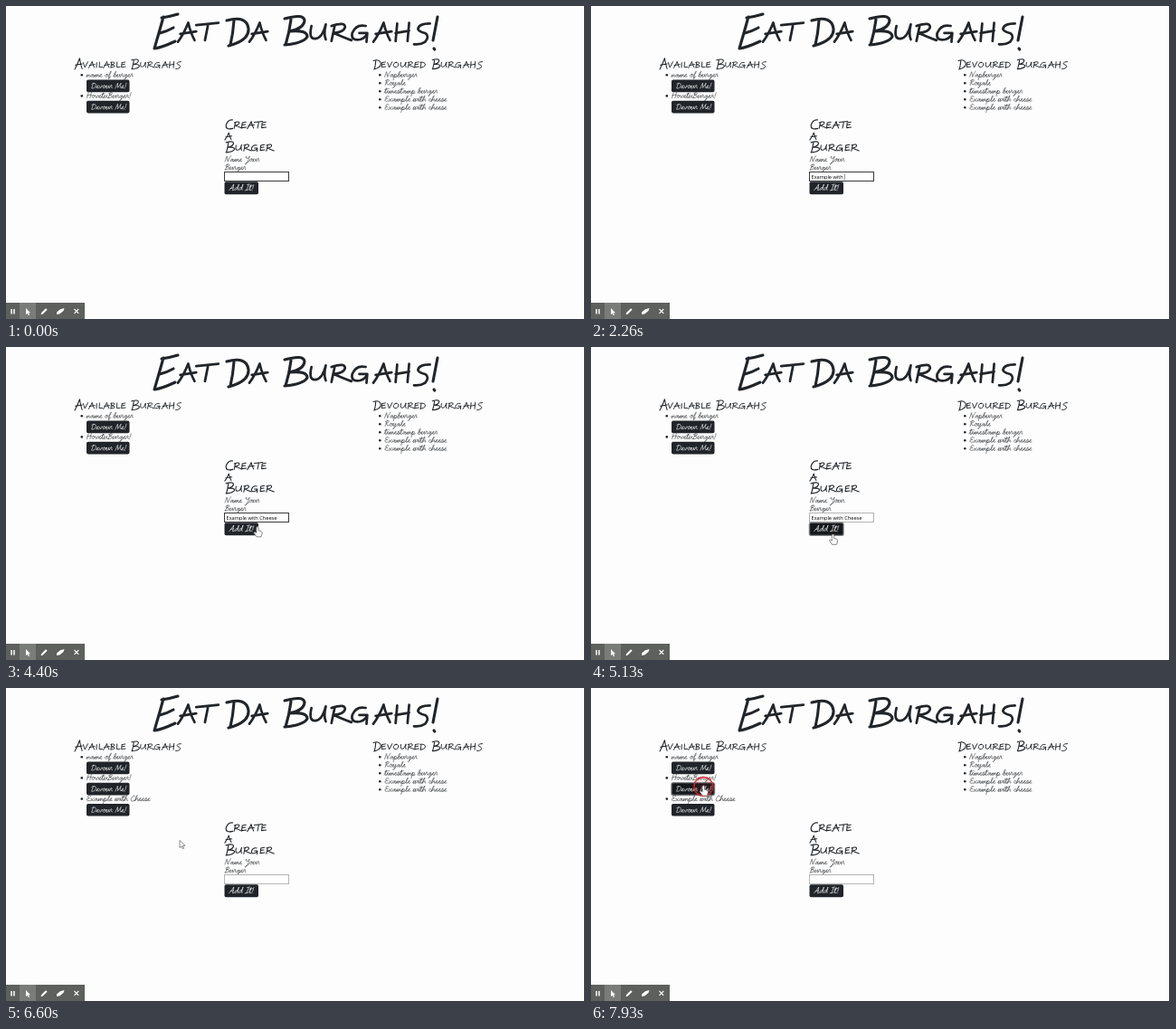
An HTML page that plays this animation: 640 by 346 pixels, repeating every 8 s.

```html
<!DOCTYPE html>
<html lang="en">
<head>
<meta charset="utf-8">
<title>Eat Da Burgahs!</title>
<style>
html, body { margin: 0; width: 100%; height: 100%; overflow: hidden; background: #fdfdfd; }
svg { display: block; width: 640px; height: 346px; }
.ink { fill: none; stroke-linecap: round; stroke-linejoin: round; }
#typed { font: 5.65px "Open Sans", "Noto Sans", sans-serif; white-space: pre; fill: #000; }
</style>
</head>
<body>
<svg id="stage" viewBox="0 0 640 346"></svg>
<script>
const LOOP = 8000, DARK = '#212529', SHIFT = 23;

// Pen-stroke alphabets: each entry is the advance width followed by the path.
const marker = {
  width: 3.1, slant: 0, space: 15, small: 'translate(1 -1) scale(.88)',
  E: '27M10-25Q18-26 28-29M12-26Q7-8 2 9Q10 8 25 1M8-8Q16-10 23-14',
  A: '24M0 6Q8-8 16-30Q18-12 24 4M2-8L24-12',
  B: '29M10-23Q8-8 4 5M3-24Q24-30 25-22Q24-13 8-10Q28-12 28-4Q24 3 3 5',
  C: '24M22-24Q8-26 3-8Q2 6 23 1',
  D: '24M8-22Q7-8 4 5M0-22Q22-28 24-13Q25 0 2 6',
  a: '22M0 3Q7-6 13-21Q16-8 21 1M3-7L23-10',
  b: '19M5-18L3 1M2-18Q16-21 16-15Q14-10 5-9Q19-9 17-3Q12 1 3 1',
  d: '23M5-17L3 2M1-18Q20-20 20-9Q18 0 2 2',
  e: '18M4-17L2 0L17-2M3-9L14-11M4-17L16-19',
  g: '26M20-17Q8-20 3-8Q1 2 13 0Q20-2 22-8L12-8M22-8L21 3',
  h: '23M5-20L3 2M20-21L18 2M3-8L20-11',
  i: '10M5-17L4 1',
  l: '16M4-19L3 0L15-1',
  o: '23M12-18Q1-16 2-6Q4 2 13 0Q22-4 20-13Q17-20 9-17',
  r: '22M6-17L2 2M2-17Q20-23 19-15Q17-9 5-8Q14-4 27 1',
  s: '20M20-20Q6-20 5-13Q6-10 14-8Q20-4 14 3Q8 7 0 6',
  t: '18M-2-18L26-21M13-19L9 1',
  u: '23M3-17Q-1 0 8-1Q17-2 21-19Q18-6 21 0',
  v: '20M3-17L9 1L20-20',
  '!': '8M7-26L2 0M3 9l.8 1'
};
const script = {
  width: 1.05, slant: -10, space: 5,
  a: '8M6-5Q1-7 1-2Q2 2 6-5Q4 2 8-1',
  b: '7M0-1Q5-8 4-12Q1-11 1-2Q2 2 5-1Q6-5 3-5L7-4',
  c: '6M5-5Q1-8 1-2Q2 1 6-1',
  d: '8M6-5Q1-7 1-2Q2 2 6-5L7-12Q4 2 8-1',
  e: '6M0-1Q5-3 4-6Q1-6 1-2Q2 1 6-1',
  f: '6M0-1Q6-8 5-12Q2-12 2 3Q2 6 4 2L2 0L6-1',
  g: '8M6-5Q1-7 1-2Q2 2 6-5Q6 5 3 6Q0 6 8-1',
  h: '8M0-1Q5-8 4-12Q1-10 1 0Q5-7 6-5Q5 1 8-1',
  i: '4M0-1L2-6Q0 1 4-1M3-9l.5 0',
  l: '5M0-1Q5-8 4-12Q1-10 2-1Q3 1 5-1',
  m: '11M0-1Q2-6 2-5L2 0Q4-7 6-5L5 0Q8-7 9-5Q8 1 11-1',
  n: '8M0-1Q2-6 2-5L2 0Q5-7 6-5Q5 1 8-1',
  o: '7M3-6Q0-5 1-2Q3 2 5-2Q6-6 3-6Q4-4 7-5',
  p: '8M0-1L2-6L1 6M2-4Q6-8 6-3Q5 1 2 0Q5 1 8-1',
  r: '6M0-1L2-7L4-6Q3 1 6-1',
  s: '6M0-1L3-7Q6-1 3 0Q1 0 2-1L6-1',
  t: '5M0-1L3-11Q1 1 3 0L5-1M0-8L6-9',
  u: '8M0-1L2-6Q0 1 3 0Q6-2 6-6Q5 1 8-1',
  v: '7M0-5Q2-6 3 0Q6-4 5-6L7-5',
  w: '10M0-1L2-6Q0 1 3 0Q5-2 5-6Q4 1 6 0Q9-3 8-6L10-5',
  x: '7M0-5Q2-6 3-2Q5 1 7-1M6-6L1 0',
  y: '8M0-1L2-6Q0 1 3 0Q6-2 6-6Q6 5 3 6Q0 6 8-1',
  A: '11M1 0Q5-4 8-12L8 0L11-1M3-4L9-5',
  B: '10M4-11L2 0M1-9Q9-14 8-9Q7-6 3-6Q10-7 8-2Q6 1 1 0',
  C: '9M8-9Q8-13 4-10Q-1-3 3 0Q6 1 9-1',
  D: '11M4-11L2 0Q10 1 10-7Q8-13 1-9',
  E: '9M8-10Q2-13 2-8Q3-6 6-6Q0-6 1-2Q3 1 9-1',
  H: '11M3-11L2 0M9-12L8 0M1-5Q6-8 11-6',
  I: '7M2-11L7-12M5-11L3 0M0 0L5-1',
  M: '13M1 0L4-11L6-1L11-11Q9 0 13-1',
  N: '11M1 0L3-11L7 0Q8-8 11-12',
  R: '10M4-11L2 0M1-9Q9-14 8-9Q7-6 3-6Q6 1 10-1',
  Y: '10M1-9Q3-14 3-7Q6-4 9-11Q7 5 3 6Q0 5 10-1',
  '!': '4M3-11L2-3M1.5 0l.3 0'
};

function write(text, x, y, scale, font = marker, color = DARK) {
  let pen = 0, out = '';
  for (const ch of text) {
    const glyph = font[ch];
    const fit = /[a-z]/.test(ch) && font.small || '';
    if (glyph) out += `<path transform="translate(${pen}) ${fit}" d="${glyph.slice(glyph.indexOf('M'))}"/>`;
    pen += glyph ? parseFloat(glyph) : font.space;
  }
  return `<g class="ink" role="img" aria-label="${text}" stroke="${color}" stroke-width="${font.width}"
    transform="translate(${x} ${y}) scale(${scale}) skewX(${font.slant})">${out}</g>`;
}
const note = (text, x, y) => write(text, x, y, .535, script, '#3c4043');
const bullet = (text, x, y) => `<circle cx="${x - 4.7}" cy="${y - 2.3}" r="1.3" fill="${DARK}"/>` + note(text, x, y);
const button = (text, x, y, w, h, scale, id) =>
  `<rect id="${id}" x="${x}" y="${y}" width="${w}" height="${h}" rx="1.8" fill="${DARK}"/>` +
  write(text, x + 4.5, y + h / 2 + 2.6, scale, script, '#f4f4f4');
const burger = (name, i) => bullet(name, 88.5, 78.5 + i * 23.2) +
  button('Devour Me!', 89, 81.6 + i * 23.2, 47.5, 13.6, .535, 'devour' + i);

const stage = document.getElementById('stage');
stage.innerHTML = `
  <rect width="640" height="346" fill="#fdfdfd"/>
  <rect x="639" width="1" height="346" fill="#333"/>
  ${write('Eat Da Burgahs!', 162, 38, 1)}
  ${write('Available Burgahs', 76, 68, .34)}
  ${write('Devoured Burgahs', 406, 68, .345)}
  ${burger('name of burger', 0)}${burger('HovetuBurger!', 1)}
  <g id="added">${burger('Example with Cheese', 2)}</g>
  ${['Napburger', 'Royale', 'timestamp burger', 'Example with cheese', 'Example with cheese']
    .map((name, i) => bullet(name, 418, 78.5 + i * 9)).join('')}
  <g id="form">
    ${write('Create', 242, 135, .38)}${write('a', 241.5, 147.5, .38)}${write('Burger', 242, 160, .38)}
    ${note('Name Your', 241.5, 172)}${note('Burger', 241.5, 181)}
    <rect id="field" x="241.5" y="183.5" width="71" height="10" fill="#fff"/>
    <text id="typed" x="243.5" y="191.2"></text>
    <rect id="caret" y="185.5" width=".6" height="7" fill="#555"/>
    ${button('Add It!', 241.5, 194.2, 37.5, 14, .57, 'add')}
  </g>
  <circle id="ripple" stroke="#e0242b" stroke-width="1.5" fill="#e0242b" fill-opacity=".12"/>
  <g id="pointer" fill="#fff" stroke="#6a6a6a" stroke-width=".8" stroke-linejoin="round">
    <path id="hand" d="M-1.2 1Q0-1 1.2 1V4.5L4 5.2Q5.5 6 5 8L4 11.3H-1L-4 7Q-4 5-1.2 7Z"/>
    <path id="arrow" d="M0 0V8L2 6.3L3.3 9.3L4.6 8.7L3.3 5.8H6Z"/>
  </g>
  <g transform="translate(0 328)">
    <rect width="87" height="18" fill="#5d605d"/><rect x="15" width="18" height="18" fill="#7a7c7a"/>
    <path d="M5.3 7h1.5v5.5h-1.5zM8.2 7h1.5v5.5h-1.5z" fill="#fff"/>
    <path d="M22 6V13L23.7 11.7L24.9 14L26 13.5L24.9 11.2H27Z" fill="#fff"/>
    <path d="M38.5 13.2L39.2 11L44 6.2L45.6 7.8L40.8 12.6Z" fill="#fff"/>
    <path d="M56 10.5L60 7.3L64.5 6L63.5 9L59.5 12.3L56.2 13Z" fill="#fff"/>
    <path d="M75.5 7L80.3 11.8M80.3 7L75.5 11.8" stroke="#fff" stroke-width="1.1"/>
  </g>`;

const el = id => document.getElementById(id);
const set = (id, attrs) => { for (const k in attrs) el(id).setAttribute(k, attrs[k]); };
const show = (id, on) => set(id, { visibility: on ? 'inherit' : 'hidden' });

const phrase = 'Example with Cheese';
const keyTimes = [460, 800, 1000, 1060, 1260, 1330, 1530, 1660, 1800, 1930, 2060, 2130, 2260,
  2800, 3000, 3200, 3260, 3400, 3530];
const PRESS = 4800, RELOAD = 5730, DEVOUR = 7860;

const moves = [
  { start: 4400, end: 4600, steps: 4, from: [278, 198.5], to: [267.5, 207], shape: 'hand' },
  { start: 6400, end: 6600, steps: 4, from: [258, 201], to: [192, 168.5], shape: 'arrow' },
  { start: 6860, end: 6930, steps: 2, from: [160, 136], to: [160, 136], shape: 'arrow', gone: 6930 },
  { start: 7130, end: 7530, steps: 7, from: [127, 116], to: [124.3, 107.8], shape: 'hand' }
];

function drawPointer(t) {
  const move = moves.filter(m => t >= m.start).pop();
  const visible = move && !(t >= move.gone);
  show('pointer', visible);
  if (!visible) return;
  const last = move.steps - 1;
  const p = Math.min(1, Math.floor((t - move.start) / (move.end - move.start) * last + .05) / last);
  const [x, y] = move.from.map((v, i) => v + (move.to[i] - v) * p);
  set('pointer', { transform: `translate(${x} ${y})` });
  show('hand', move.shape === 'hand');
  show('arrow', move.shape === 'arrow');
}

function drawRipple(t) {
  const second = t >= DEVOUR, age = t - (second ? DEVOUR : PRESS), on = age >= 0 && age < 330;
  show('ripple', on);
  if (on) set('ripple', {
    cx: second ? 124.3 : 267.5, cy: second ? 109 : 207,
    r: 9.5 + age / 75, opacity: 1 - age / 400
  });
}

function focusRing(id, on) {
  set(id, {
    stroke: on ? '#6c7074' : 'none', 'stroke-width': 1.6,
    'stroke-opacity': .7, fill: on ? '#16191c' : DARK
  });
}

function draw(t) {
  const reloaded = t >= RELOAD, focused = t < PRESS;
  const count = keyTimes.filter(k => t >= k).length;
  const typed = el('typed');
  typed.textContent = reloaded ? '' : phrase.slice(0, count);
  const sinceKey = t - keyTimes[count - 1];
  show('caret', focused && count && sinceKey % 1060 < 530);
  set('caret', { x: 243.5 + typed.getComputedTextLength() });
  set('field', { stroke: focused ? '#3a3a3a' : '#b4b4b4' });
  set('form', { transform: `translate(0 ${reloaded ? SHIFT : 0})` });
  show('added', reloaded);
  focusRing('add', !focused && !reloaded);
  focusRing('devour1', t >= DEVOUR);
  drawRipple(t);
  drawPointer(t);
}

function tick() {
  draw(performance.now() % LOOP);
  requestAnimationFrame(tick);
}
tick();
</script>
</body>
</html>
```
